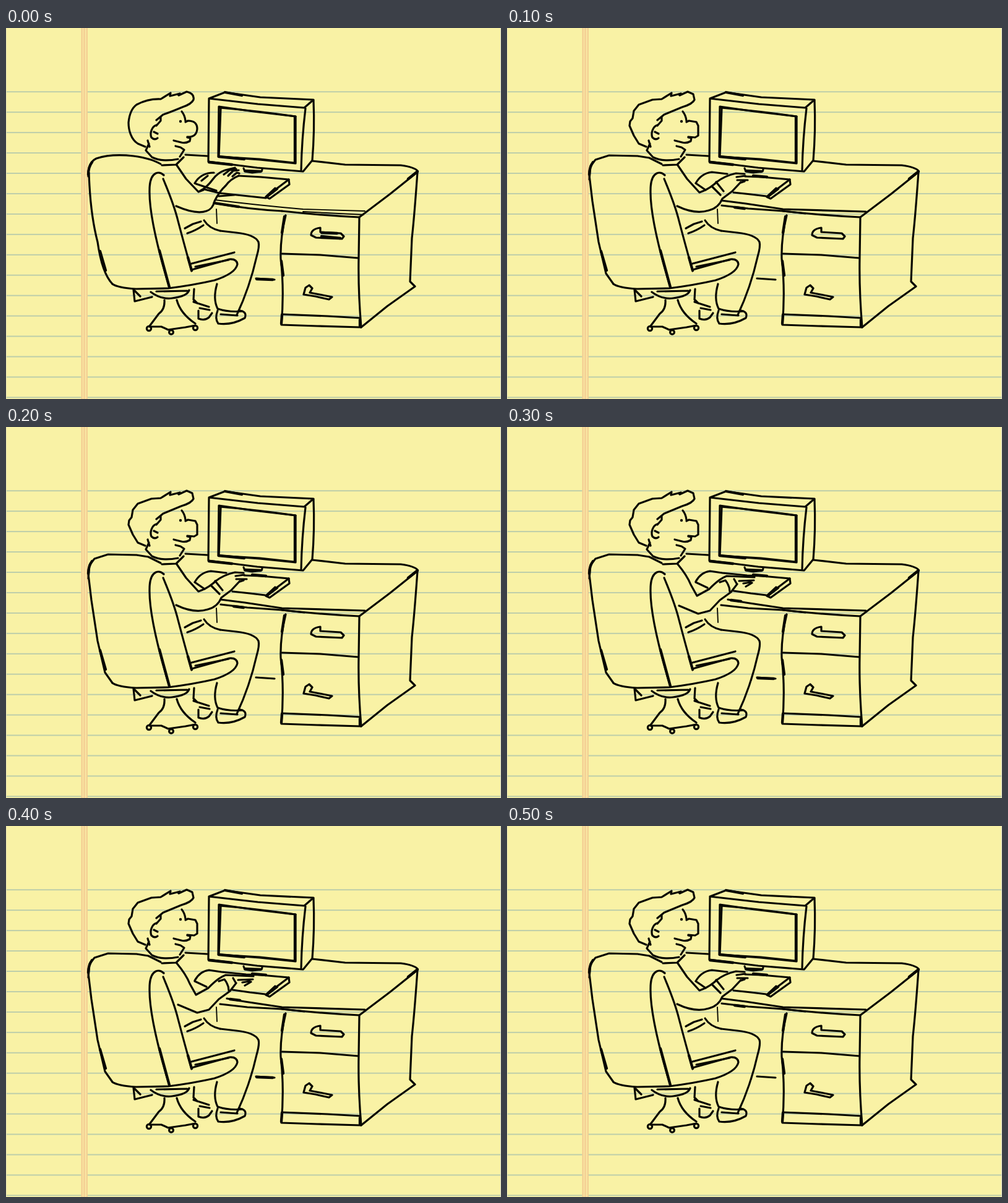
Write an HTML page that moves like this. It is 800x600 px and loops after 600 ms.

```html
<!DOCTYPE html>
<html lang="en">
<head>
<meta charset="utf-8">
<title>Typing at a desk</title>
<style>
  html, body { margin: 0; width: 100%; height: 100%; overflow: hidden; background: #f9f2a5; }
  svg { display: block; width: 800px; height: 600px; }
  .ink { fill: none; stroke: #080800; stroke-width: 3.2; stroke-linecap: round; stroke-linejoin: round; }
  .bold { stroke-width: 4.3; }
  .fine { stroke-width: 1.9; }
</style>
</head>
<body>
<svg viewBox="0 0 800 600">
  <defs>
    <pattern id="rule" y="102.2" width="800" height="32.95" patternUnits="userSpaceOnUse">
      <path d="M0 1H800" stroke="#a9c2ac" stroke-width="1.7"/>
    </pattern>
  </defs>

  <!-- paper -->
  <rect width="800" height="600" fill="#f9f2a5"/>
  <rect y="102" width="800" height="498" fill="url(#rule)"/>
  <path d="M126.5 0V600" stroke="#f8e3a0" stroke-width="10"/>
  <path d="M122.5 0V600M126.5 0V600M131 0V600" stroke="#f2c78f" stroke-width="1.5"/>
  <path d="M.5 0V600" stroke="#e3e0b2"/>
  <path d="M799.5 0V600" stroke="#d6d8cc"/>

  <g class="ink">
    <!-- face and neck -->
    <path d="M243 157C236 159 232 170 235 177Q240 182 245 178M239 168L245 171M243 158L250 150L250 144"/>
    <path d="M284 135Q289 141 290 150M293 177L298 178L297 183Q290 187 283 185L271 182"/>
    <path d="M274 191L282 193L288 197L281 208"/>
    <path d="M231 187L226 198L236 209Q252 217 278 212M229 182L232 192M252 222L275 221L287 209"/>
    <circle cx="282" cy="151" r="2.2" fill="#080800" stroke="none"/>

    <!-- chair -->
    <path d="M264 420C249 370 231 300 232 262Q232 240 242 235Q249 232 255 238"/>
    <path d="M254 244Q272 287 278 312Q288 350 300 393"/>
    <path d="M172 414Q180 420 210 422L262 421Q302 416 337 408Q371 397 374 382Q373 373 361 374L300 391"/>
    <path d="M300 381L369 363M306 386L360 375"/>
    <path d="M206 423L208 442L236 435M207 424L217 434M234 427Q250 439 268 437Q293 434 296 424M243 426L293 425"/>
    <path d="M256 440Q257 455 247 462L232 482M276 440Q282 462 306 478"/>
    <path d="M232 483L251 483L262 488L290 484L306 481"/>
    <circle cx="231" cy="486" r="3.6"/><circle cx="267" cy="492" r="3.4"/><circle cx="306" cy="485" r="3.6"/>

    <!-- trousers and shoes -->
    <path d="M289 324L302 317L315 313M293 332Q306 328 319 319M320 311Q328 324 346 328"/>
    <path d="M346 328L372 331Q402 334 408 346Q410 353 405 370Q394 419 373 464"/>
    <path class="fine" d="M340 293L341 316"/>
    <path d="M341 414Q334 438 342 454M342 454Q360 460 382 458M347 463L374 465"/>
    <path d="M342 457Q337 470 343 478Q365 481 386 469Q390 459 378 457"/>
    <path d="M304 422L303 439L309 445M303 443L328 451M311 457L311 470Q321 474 328 468L333 461M313 453L329 456"/>

    <!-- monitor -->
    <path d="M328 115L327 216L406 226L480 232M328 114L354 104L411 112L497 116L482 129L407 123L328 114"/>
    <path d="M497 117Q499 166 495 214L481 231M484 130Q478 180 477 230"/>
    <path d="M344 127L400 135L468 143L468 219L410 213L343 208Z"/>
    <path d="M347 130L344 208L410 212L466 218M346 129Q405 134 468 143"/>
    <path d="M384 227L386 232L398 234L413 232L414 229"/>

    <!-- desk -->
    <path d="M290 205L325 207M495 215L548 221L638 222Q660 225 665 231"/>
    <path d="M665 233L620 269L571 306"/>
    <path d="M665 233Q660 304 656 340L653 410L661 418L616 450L574 484"/>
    <path d="M446 296Q510 303 571 306"/>
    <path d="M452 303Q443 340 444 373Q450 424 445 480L503 482L573 484"/>
    <path d="M571 306L570 372Q569 425 574 484M446 365L508 367L569 372M446 463L520 466L573 469"/>
    <path d="M404 405L434 407"/>
    <path d="M508 330L508 323Q493 325 493 335L501 339L543 341L546 337L541 332L508 330"/>
    <path d="M481 431L484 420L490 416L495 421L491 428L512 432L527 435L522 439L500 434Z"/>

    <!-- keyboard end -->
    <path d="M420 273L457 245L458 253L426 276L420 273L435 259"/>

    <g class="bold">
      <path d="M467 144L467 218M133 237Q133 225 139 217M248 360L264 419M300 392L294 371"/>
      <path d="M354 104L381 109M328 217L365 221M386 231L411 232M421 273L438 260M665 232L650 244"/>
      <path d="M446 464L445 478M445 377L448 400M572 482L572 472M344 208L385 212"/>
      <path d="M152 361L161 392M450 305L446 331"/>
    </g>
  </g>

  <!-- the three drawings of what changes -->
  <g class="ink pose">
    <path d="M225 192L213 187C202 180 198 165 198 153Q200 132 211 124Q230 114 250 115L266 105L265 110L281 106L279 109L292 103Q305 106 303 116Q300 123 285 128Q266 136 254 140L243 149"/>
    <path d="M290 152L294 150Q309 150 309 163Q308 177 293 176"/>
    <path d="M133 240Q132 218 146 211Q170 203 206 207Q235 211 250 220"/>
    <path d="M134 234Q136 300 148 346Q155 396 172 414"/>
    <path d="M276 222L291 244L311 265Q324 259 334 245Q342 234 354 230L370 226M311 265L319 262"/>
    <path d="M275 288Q307 302 324 296Q334 293 337 280Q345 264 355 255Q363 244 376 239"/>
    <path d="M352 237L361 230L372 228M359 239L367 231L376 230M366 240L373 234L377 235"/>
    <path d="M305 251Q315 234 336 234M307 252L340 263M316 247L326 239M321 261L345 267L420 275"/>
    <path d="M376 239L412 241L457 245M344 272L369 270"/>
    <path d="M336 283Q390 293 446 296"/>
    <path class="fine" d="M338 278Q410 287 480 293L580 296M480 297L578 302"/>
    <path class="bold" d="M337 283L376 289M405 406L431 407M510 337L540 340M510 331L535 332"/>
  </g>

  <g class="ink pose">
    <path d="M225 192L213 187L205 174L198 158L199 151L203 146L205 134L213 124L235 116L250 115L266 105L265 110L281 106L279 109L292 103L301 107L303 116Q300 123 283 128L254 140L243 149"/>
    <path d="M290 152L294 150L306 152L309 158L309 174L304 177L293 176"/>
    <path d="M133 245L135 223L143 213L165 206L211 207L230 210L250 220"/>
    <path d="M133 238L138 280L148 346L160 397L172 414"/>
    <path d="M276 222L291 244L311 266Q328 260 339 249Q352 239 370 235L384 236"/>
    <path d="M275 288Q304 302 326 295Q342 291 348 276L364 264L378 249"/>
    <path d="M371 241L385 239M372 246L389 246M378 250L384 248M338 249L350 264M331 256L345 270"/>
    <path d="M305 251Q314 235 331 233L356 236M305 251L321 262"/>
    <path d="M385 240L412 241L457 245M366 266L394 269L419 272"/>
    <path d="M347 279L386 284L446 293L580 297M347 287L390 292L446 296L482 300"/>
    <path class="bold" d="M368 290L384 292M398 239L420 241"/>
  </g>

  <g class="ink pose">
    <path d="M225 192L213 187L205 174L198 158L199 151L203 146L205 134L213 124L235 116L250 115L266 105L265 110L281 106L279 109L292 103L301 107L303 116Q300 123 283 128L254 140L243 149"/>
    <path d="M290 152L294 150L306 152L309 158L309 174L304 177L293 176"/>
    <path d="M133 245L135 223L143 213L165 206L211 207L230 210L250 220"/>
    <path d="M133 238L138 280L148 346L160 397L172 414"/>
    <path d="M276 222Q291 240 297 255L307 273L327 262Q342 246 355 241L400 243"/>
    <path d="M278 289L309 302L328 297L344 280L362 267L372 254"/>
    <path d="M344 251L353 248Q360 257 360 266M367 246L371 253M375 249L399 248M386 258L396 252M382 253L394 251"/>
    <path d="M305 250Q313 235 328 233L348 236L388 240L412 241L457 245M305 251L324 260"/>
    <path d="M366 265L394 269L419 272"/>
    <path d="M357 279L386 284L446 293L580 297M346 288L390 293L446 296L482 300"/>
    <path class="bold" d="M405 406L431 407M362 280L378 282M398 239L420 241"/>
  </g>
</svg>
<script>
  const poses = document.querySelectorAll('.pose');
  const order = [0, 1, 1, 2, 2, 1];
  const start = performance.now();

  function draw(now) {
    const step = Math.floor(Math.max(0, now - start) / 100) % order.length;
    poses.forEach((pose, i) => pose.style.display = i === order[step] ? '' : 'none');
    requestAnimationFrame(draw);
  }
  draw(start);
</script>
</body>
</html>
```
